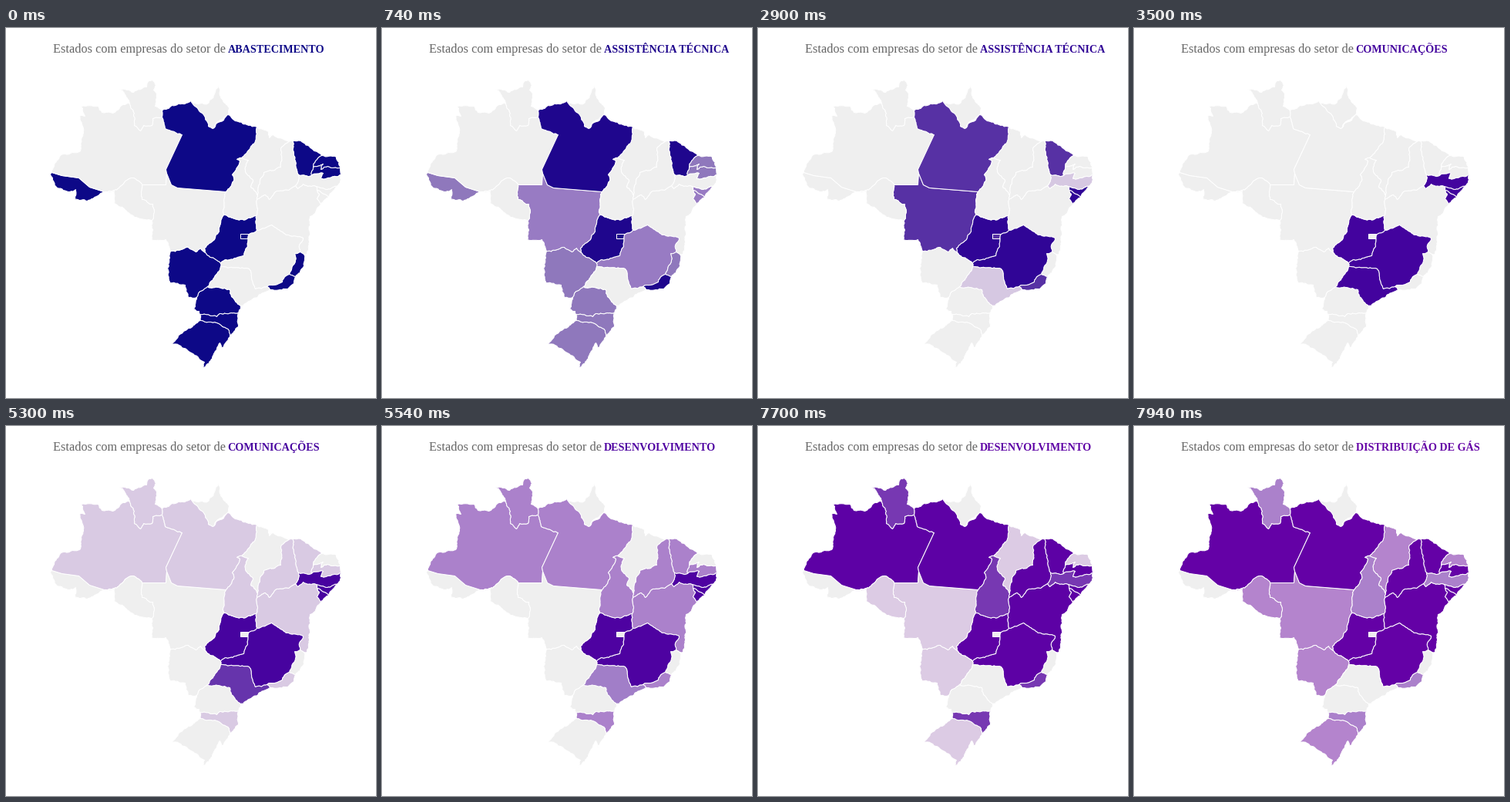
Recreate the animation shown at these times as a matplotlib script. Size 480 by 480 pixels, loop 8000 ms.

```python
import random

import matplotlib.pyplot as plt
import numpy as np
from matplotlib.animation import FuncAnimation
from matplotlib.collections import PolyCollection

SIZE, DPI = 480, 100
STEP, LOOP = 20, 8000
HOLD, TICK, TICKS = 1800, 120, 5
CYCLE = HOLD + TICK * TICKS
LEAD = 1300  # part of the first hold already elapsed
GREY = (0xEF / 255,) * 3

SECTORS = [
    ("ABASTECIMENTO", "PA AC GO DF MS PR SC RS RJ ES CE RN PB"),
    ("ASSISTÊNCIA TÉCNICA", "PA MT GO DF MG RJ CE AL SE"),
    ("COMUNICAÇÕES", "GO MG SP PE AL SE"),
    ("DESENVOLVIMENTO", "AM RR PA TO PI CE PB PE AL SE BA GO MG RJ SC"),
    ("DISTRIBUIÇÃO DE GÁS", "AM PA PI CE PB AL SE BA GO MG MA RN RO MT MS RS"),
]

rng = random.Random(4)


def jagged(a, b, rough):
    """Points after a up to b, by repeated midpoint displacement."""
    dx, dy = b[0] - a[0], b[1] - a[1]
    length = np.hypot(dx, dy)
    if not rough or length < 3:
        return [b]
    k = rng.uniform(-1, 1) * min(rough, 1.2 / length)
    mid = ((a[0] + b[0]) / 2 - k * dy, (a[1] + b[1]) / 2 + k * dx)
    return jagged(a, mid, rough) + jagged(mid, b, rough)


class Borders:
    """A pen that draws border lines, each from where the last one ended."""

    def __init__(self):
        self.lines = []

    def at(self, x, y):
        self.pen = (x, y)
        return self

    def to(self, owners, *xy, rough=0.16):
        line = [self.pen]
        for key in zip(xy[::2], xy[1::2]):
            line += jagged(line[-1], key, rough)
        self.pen = line[-1]
        self.lines.append((owners.split(), line))
        return self

    def ring(self, state):
        """Join the state's lines end to end."""
        parts = [line for owners, line in self.lines if state in owners]
        path = list(parts.pop(0))
        while parts:
            i = next(i for i, p in enumerate(parts) if path[-1] in (p[0], p[-1]))
            part = parts.pop(i)
            path += part[1:] if part[0] == path[-1] else part[-2::-1]
        return path


b = Borders()

# outer edge, clockwise from the far west
b.at(59, 187)
b.to("AM", 62, 179, 70, 165, 96, 159, 100, 130, 95, 114, 102, 114, 97, 101,
     119, 101, 124, 109, 138, 110, 157, 97, 160, 97)
b.to("RR", 153, 84, 147, 79, 165, 83, 182, 76, 185, 68, 189, 67, 194, 74,
     191, 80, 195, 86, 193, 101, 202, 107)
b.to("PA", 215, 100, 239, 94, 241, 97)
b.to("AP", 262, 97, 275, 74, 280, 92, 289, 103, 287, 112, 274, 121, 268, 130)
b.to("PA", 273, 123, 282, 119, 287, 112, 301, 121, 325, 128)
b.to("MA", 340, 134, 341, 142, 346, 138, 368, 146)
b.to("PI", 371, 146)
b.to("CE", 382, 146, 396, 156, 409, 165)
b.to("RN", 428, 167, 433, 181)
b.to("PB", 434, 190)
b.to("PE", 434, 196, 430, 204)
b.to("AL", 418, 219)
b.to("SE", 408, 228)
b.to("BA", 399, 241, 394, 244, 394, 268, 390, 293, 386, 293)
b.to("ES", 386, 304, 381, 317, 375, 322)
b.to("RJ", 373, 331, 365, 338, 342, 339)
b.to("SP", 321, 350, 307, 360, 304, 360)
b.to("PR", 304, 364, 301, 369)
b.to("SC", 301, 387, 290, 400)
b.to("RS", 279, 417, 277, 408, 265, 431, 254, 443, 257, 433, 240, 421, 224, 411,
     214, 409, 230, 393, 252, 379)
b.to("SC", 251, 371)
b.to("PR", 250, 367, 243, 364, 247, 349)
b.to("MS", 236, 349, 232, 333, 212, 330, 210, 306, 213, 289)
b.to("MT", 207, 274, 188, 274, 190, 262, 189, 249)
b.to("RO", 171, 246, 140, 227, 140, 211, 127, 212)
b.to("AC", 105, 224, 89, 222, 90, 209, 82, 212, 66, 207, 57, 190, 59, 187)

# north
b.to("AC AM", 72, 191, 94, 194, 108, 206, 127, 212, rough=0)
b.to("AM RO", 140, 210, 159, 195, 167, 195, 176, 203)
b.to("AM MT", 207, 203, 208, 188, rough=0)
b.to("AM PA", 207, 183, 228, 138, rough=0)
b.to("AM PA", 206, 130, 202, 115).to("RR PA", 202, 107)
b.at(202, 115).to("RR AM", 190, 117, 189, 126, 178, 126, 174, 133, 166, 126, 166, 110, 160, 97)
b.at(176, 203).to("RO MT", 176, 222, 190, 228, 192, 238, 189, 249)
b.at(241, 97).to("PA AP", 254, 110, 262, 127, 268, 130)
b.at(208, 188).to("PA MT", 214, 203, 222, 207, 285, 212, rough=0)
b.to("PA TO", 295, 198, 293, 190, 303, 172, 299, 170, 305, 168)
b.to("PA MA", 323, 146, 325, 128)

# centre
b.at(305, 168).to("MA TO", 314, 171, 310, 186, 320, 197, 317, 206, 326, 217)
b.to("PI TO", 325, 222).to("TO BA", 324, 243)
b.to("TO GO", 312, 247, 296, 247, 282, 242).to("MT TO", 285, 212)
b.at(282, 242).to("MT GO", 276, 262, 270, 274, 257, 285, 258, 291)
b.to("GO MS", 278, 305).to("MG MS", 278, 309)
b.to("MS SP", 270, 323, 261, 335).to("MS PR", 249, 344, 247, 349)
b.at(213, 289).to("MT MS", 236, 284, 246, 290, 252, 285, 258, 291)
b.at(278, 305).to("GO MG", 284, 300, 308, 295, 313, 283, 315, 267, 325, 262)
b.to("GO BA", 324, 243)
b.at(304, 267).to("DF", 314, 267, 313, 273, 304, 273, 304, 267, rough=0)

# northeast
b.at(368, 146).to("MA PI", 357, 154, 356, 180, 334, 187, 326, 217)
b.at(371, 146).to("PI CE", 374, 170, 379, 190).to("PI PE", 379, 197, 375, 204)
b.to("PI BA", 366, 210, 349, 212, 341, 222, 336, 216, 325, 222)
b.at(375, 204).to("PE BA", 378, 208, 385, 202, 402, 205)
b.to("AL BA", 403, 210).to("AL SE", 418, 219)
b.at(403, 210).to("SE BA", 406, 215, 403, 221, 408, 228)
b.at(402, 205).to("PE AL", 416, 209, 430, 204)
b.at(379, 190).to("CE PE", 396, 191).to("PB PE", 411, 188, 408, 195, 434, 190)
b.at(396, 191).to("CE PB", 398, 180).to("CE RN", 401, 172, 409, 165)
b.at(398, 180).to("RN PB", 411, 176, 408, 183, 417, 179, 433, 181)

# southeast and south
b.at(325, 262).to("BA MG", 344, 255, 366, 268, 385, 272, 380, 281, 381, 290)
b.to("BA ES", 386, 293)
b.at(381, 290).to("MG ES", 374, 292, 375, 301, 367, 319)
b.to("MG RJ", 363, 321, 358, 329, 338, 335).to("RJ SP", 342, 339)
b.at(367, 319).to("ES RJ", 375, 322)
b.at(278, 309).to("MG SP", 315, 312, 323, 338, 338, 335)
b.at(261, 335).to("SP PR", 290, 339, 292, 348, 304, 360)
b.at(251, 371).to("PR SC", 273, 374, 277, 370, 301, 369)
b.at(252, 379).to("SC RS", 273, 382, 289, 392, 290, 400)

# colour mixing in CIE Lab
TO_XYZ = np.array([[0.4124, 0.3576, 0.1805],
                   [0.2126, 0.7152, 0.0722],
                   [0.0193, 0.1192, 0.9505]])
WHITE = TO_XYZ.sum(axis=1)
TO_LAB = np.array([[0, 116, 0], [500, -500, 0], [0, 200, -200]])


def rgb_to_lab(rgb):
    c = np.asarray(rgb, float)
    lin = np.where(c > 0.04045, ((c + 0.055) / 1.055) ** 2.4, c / 12.92)
    r = TO_XYZ @ lin / WHITE
    f = np.where(r > 0.008856, np.cbrt(r), 7.787 * r + 16 / 116)
    return TO_LAB @ f - (16, 0, 0)


def lab_to_rgb(lab):
    fy = (lab[0] + 16) / 116
    f = np.array([fy + lab[1] / 500, fy, fy - lab[2] / 200])
    r = np.where(f > 0.2069, f ** 3, (f - 16 / 116) / 7.787)
    lin = np.clip(np.linalg.solve(TO_XYZ, r * WHITE), 0, 1)
    c = np.where(lin > 0.0031308, 1.055 * lin ** (1 / 2.4) - 0.055, 12.92 * lin)
    return np.clip(c, 0, 1)


def mix(start, end, k):
    return lab_to_rgb(start + (end - start) * k)


# the enclave DF goes last, on top of GO
STATES = sorted({s for owners, _ in b.lines for s in owners} - {"DF"}) + ["DF"]
plasma = plt.get_cmap("plasma")
hues = [rgb_to_lab(plasma(i / 19)[:3]) for i in range(len(SECTORS))]
blank = rgb_to_lab(GREY)
members = [set(names.split()) for _, names in SECTORS]

plt.rcParams["path.simplify"] = False
fig = plt.figure(figsize=(SIZE / DPI, SIZE / DPI), dpi=DPI, facecolor="white")
ax = fig.add_axes([0, 0, 1, 1])
ax.set(xlim=(-0.5, SIZE - 0.5), ylim=(SIZE - 0.5, -0.5))  # whole numbers are pixel centres
ax.axis("off")

land = PolyCollection([b.ring(s) for s in STATES], edgecolors="white",
                      linewidths=72 / DPI, joinstyle="bevel")
ax.add_collection(land, autolim=False)


def label(x, px, text="", **style):
    return ax.text(x, 31.5, text, family="Liberation Serif", fontsize=px * 72 / DPI,
                   va="baseline", ha="left", **style)


label(60.5, 16.25, "Estados com empresas do setor de", color="#666666")
title = label(287, 14.15, weight="bold")


def fill(state, k):
    return hues[k] if state in members[k] else blank


def draw(i):
    k, rest = divmod(i * STEP + LEAD, CYCLE)
    tick = 0 if rest < HOLD else (rest - HOLD) // TICK + 1
    part = tick / (TICKS + 1)
    after = min(k + 1, len(SECTORS) - 1)
    land.set_facecolor([mix(fill(s, k), fill(s, after), part) for s in STATES])
    title.set_text(SECTORS[k if part < 0.5 else after][0])
    title.set_color(mix(hues[k], hues[after], part))
    return land, title


anim = FuncAnimation(fig, draw, frames=LOOP // STEP, interval=STEP,
                     repeat=True, repeat_delay=0)
plt.show()
```
